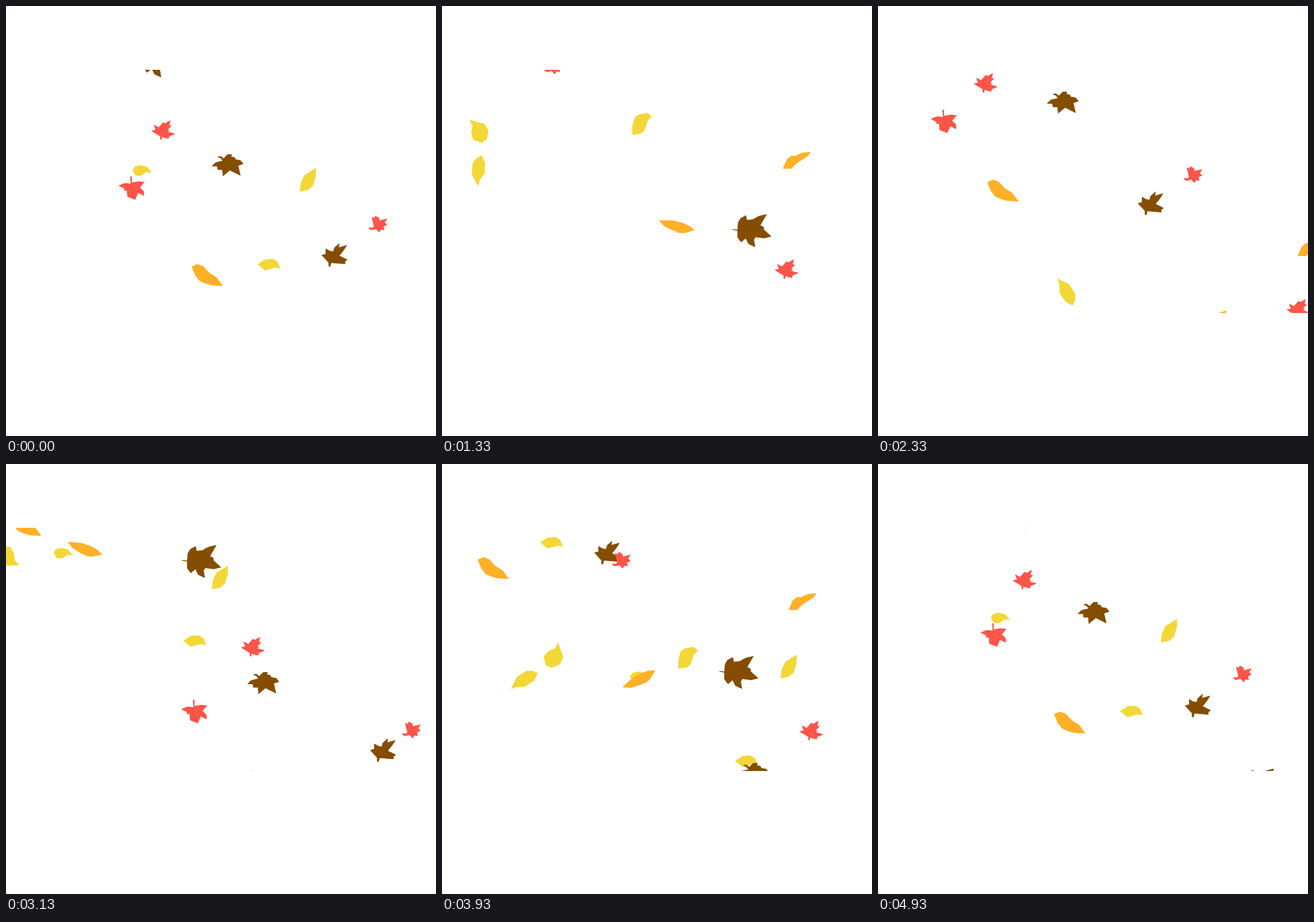
An HTML page with a canvas that plays this animation: 748 px wide and 748 px high, repeating every 4990 ms.

```html
<!DOCTYPE html>
<html lang="en">
<head>
<meta charset="utf-8">
<title>Falling leaves</title>
<style>
html, body { margin: 0; height: 100%; overflow: hidden; background: #fff; }
canvas { display: block; }
</style>
</head>
<body>
<canvas width="748" height="748"></canvas>
<script>
const ctx = document.querySelector('canvas').getContext('2d');
const YELLOW = '#f3d737', ORANGE = '#ffb026', BROWN = '#854d00', RED = '#ff5549';
const LOOP = 4990, TICKS = 75, LEAD = 30;
const FIRST = 0, SECOND = 41; // ticks at which the two gusts start
const leaves = [];

// One leaf outline, and its flights: [gust, ...key points as [tick, x, y, degrees]].
function leaf(color, outline, ...flights) {
  const path = new Path2D('M' + outline + 'Z');
  for (const [gust, ...keys] of flights) leaves.push({ color, path, gust, keys });
}

// The same flight in both gusts.
const both = (...keys) => [[FIRST, ...keys], [SECOND, ...keys]];

leaf(YELLOW, '0,8 4,2 14,0 25,3 32,12 23,11 15,17 5,17',
  [FIRST, [0, 220, 277], [8, 411, 424]],
  [SECOND, [6, 83, 146], [18, 327, 361]]);
leaf(YELLOW, '27,0 27,14 22,30 14,37 0,40 2,24 8,12',
  [FIRST, [-16, 190, 68], [0, 511, 282], [8, 640, 365]],
  [SECOND, [6, 358, 177], [18, 589, 332]]);
leaf(YELLOW, '0,9 12,1 26,0 34,5 38,16 30,14 12,19',
  [FIRST, [-16, 171, 127], [0, 438, 440]],
  [SECOND, [6, 309, 298], [18, 510, 507]]);
leaf(YELLOW, '0,37 0,23 4,8 10,3 26,0 33,6 26,13 20,31 14,35',
  [FIRST, [20, 331, 186], [35, 560, 546]],
  [SECOND, [6, 251, 54], [18, 411, 318]]);
leaf(YELLOW, '-18,-20 7,-13 14,-2 11,13 3,19 -12,14 -15,2 -13,-10',
  [FIRST, [20, 66, 218, 0], [35, 330, 560, -135]],
  [SECOND, [6, -1, 161, 164], [18, 195, 337, 56]]);
leaf(YELLOW, '3,-26 9,-14 8,5 0,16 -3,26 -13,7 -12,-12 -6,-21',
  [FIRST, [20, 65, 286, 0], [35, 325, 497, 144]],
  [SECOND, [6, -65, 209, -55], [18, 143, 377, 53]]);

leaf(ORANGE, '0,4 10,0 20,4 30,15 43,23 53,37 34,36 21,32 13,28 6,19',
  [FIRST, [-28, 7, 87], [-16, 62, 162], [0, 323, 449]],
  [SECOND, [-6, 190, 302], [6, 417, 533]]);
leaf(ORANGE, '0,28 7,12 15,6 20,7 34,1 47,0 43,6 23,19 14,28',
  [FIRST, [8, 398, 101], [20, 593, 254], [35, 730, 406]],
  [SECOND, [6, 403, 72], [18, 603, 225]]);
leaf(ORANGE, '-30,-8 -7,-8 10,-4 21,1 30,8 14,13 5,13 -8,8 -22,1',
  [FIRST, [8, 192, 173, 48], [20, 408, 381, 0], [35, 581, 550, -55]],
  [SECOND, [6, 137, 146, 5], [18, 342, 373, -42]]);

leaf(BROWN, '0,26 9,27 10,14 14,7 23,2 25,10 35,9 46,3 59,0 48,19 54,22 54,26 67,38 55,41 40,39 37,44 39,56 28,51 23,41 15,48 9,40 9,28',
  ...both([0, 230, 67], [6, 306, 141], [18, 482, 334], [33, 629, 530]));
leaf(BROWN, '10,4 15,3 20,7 27,0 34,0 33,4 39,5 41,9 49,10 54,16 45,19 49,36 31,27 19,37 18,26 10,26 9,20 0,20 6,14 19,11 15,6',
  ...both([-6, 294, 149], [0, 358, 258], [6, 420, 362], [18, 514, 520]));
leaf(BROWN, '30,0 29,7 43,3 38,11 30,21 44,28 40,31 40,35 16,33 14,40 12,39 12,33 0,20 7,18 7,9 14,13 20,14 22,7',
  ...both([-16, 265, 134], [-6, 452, 323], [0, 549, 413], [8, 661, 498]));

leaf(RED, '20,0 22,1 22,11 34,9 44,10 36,19 43,26 43,33 33,28 28,40 15,35 14,24 9,24 10,21 0,16 10,12 21,13',
  ...both([-6, 92, 180], [0, 196, 296], [6, 305, 410]));
leaf(RED, '32,0 30,8 34,9 28,15 30,18 26,19 40,23 30,27 29,31 17,28 17,33 15,32 15,27 0,18 7,16 4,8 12,12 20,3 23,5',
  [FIRST, [0, 253, 199], [8, 400, 316], [20, 579, 441], [35, 711, 510]],
  [SECOND, [-6, 167, 117], [6, 409, 301], [18, 622, 447]]);
leaf(RED, '5,2 9,4 11,0 17,3 18,8 31,5 27,11 31,15 25,18 26,24 20,23 18,28 12,22 5,24 0,22 1,20 5,21 9,18',
  ...both([-16, 296, 153], [-6, 532, 279], [0, 631, 365], [8, 707, 476]));

// Smooth curve through the keys, continued straight beyond both ends.
function valueAt(keys, t, c) {
  const last = keys.length - 1;
  const val = k => keys[k][c] || 0;
  const slope = k => {
    const a = Math.max(k - 1, 0), b = Math.min(k + 1, last);
    return (val(b) - val(a)) / (keys[b][0] - keys[a][0]);
  };
  const next = keys.findIndex(key => key[0] > t);
  if (next < 1) {
    const end = next ? last : 0;
    return val(end) + slope(end) * (t - keys[end][0]);
  }
  const k = next - 1, h = keys[next][0] - keys[k][0];
  const u = (t - keys[k][0]) / h, v = 1 - u;
  return v * v * ((1 + 2 * u) * val(k) + u * h * slope(k)) +
    u * u * ((1 + 2 * v) * val(next) - v * h * slope(next));
}

function draw(now) {
  let tick = Math.floor((now % LOOP + 4) * 0.015);
  if (tick % 3 === 1) tick--; // every third tick holds the picture
  ctx.clearRect(0, 0, 748, 748);
  ctx.save();
  ctx.beginPath();
  ctx.rect(0, 111, 748, 423);
  ctx.clip();
  ctx.lineJoin = 'round';
  for (const { color, path, gust, keys } of leaves) {
    const t = (tick - gust + LEAD + TICKS) % TICKS - LEAD;
    ctx.save();
    ctx.translate(valueAt(keys, t, 1) + 0.5, valueAt(keys, t, 2) + 0.5);
    ctx.rotate(valueAt(keys, t, 3) * Math.PI / 180);
    ctx.fillStyle = ctx.strokeStyle = color;
    ctx.fill(path);
    ctx.stroke(path);
    ctx.restore();
  }
  ctx.restore();
}

const begin = performance.now();
function loop() {
  draw(performance.now() - begin);
  requestAnimationFrame(loop);
}
loop();
</script>
</body>
</html>
```
